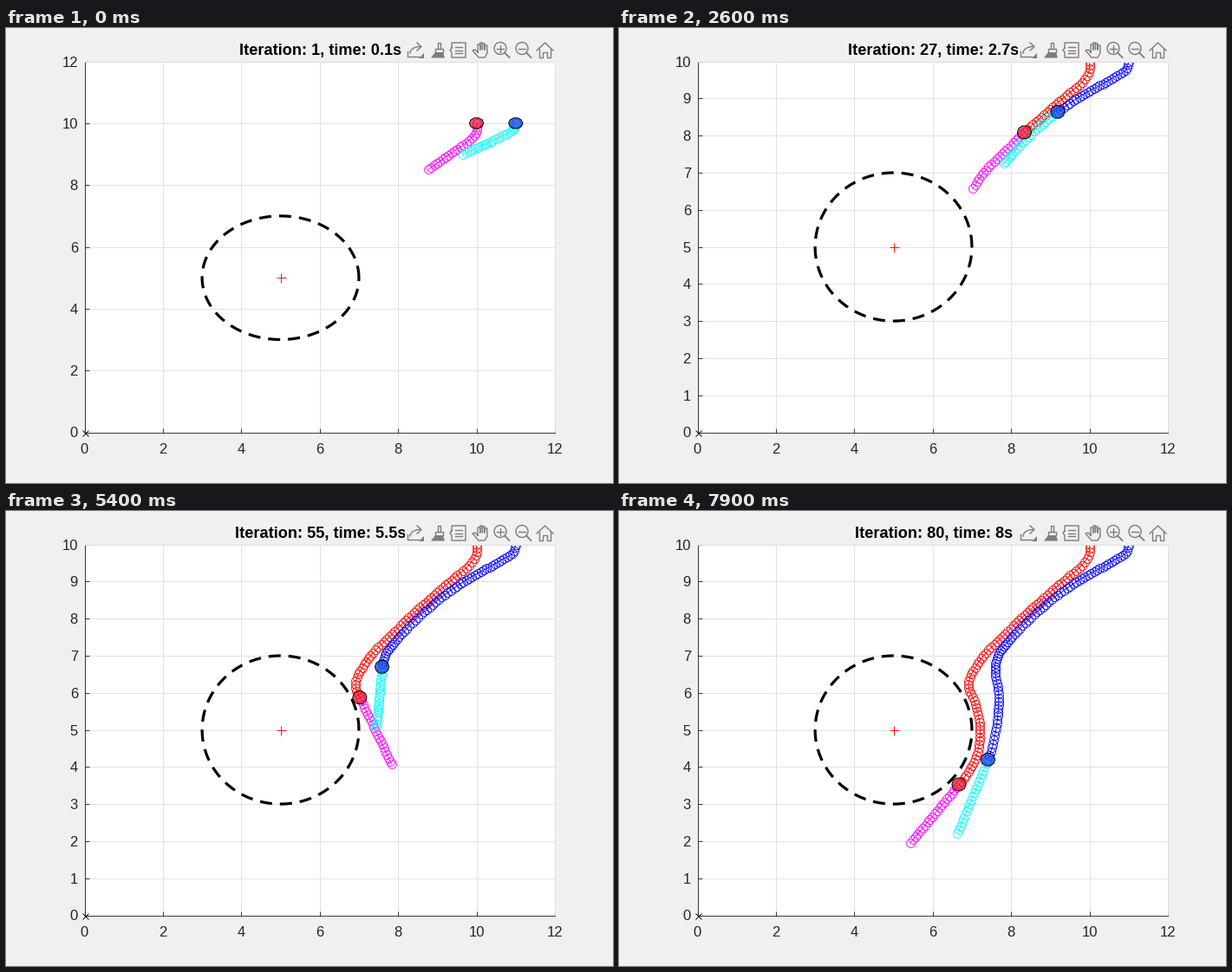
Recreate the animation shown at these times as a matplotlib script. Size 700 by 525 pixels, loop 8 s.

```python
import numpy as np
import matplotlib.pyplot as plt
from matplotlib.animation import FuncAnimation
from matplotlib.patches import Circle, Polygon, Rectangle

W, H, FRAMES, STEP_MS = 700, 525, 80, 100
PX = 0.72            # points per pixel at 100 dpi
BG, INK, GRID, ICON = "#f0f0f0", "#262626", "#dedede", "#7d7d7d"
RADIUS, HORIZON = 0.18, 20
BRAKE, SWERVE, CLEAR = 29, 45, 53    # steps at which the plans change

plt.rcParams["font.family"] = "Liberation Sans"


class Robot:
    """Moves on a smooth curve through a few (step, x, y) way points."""

    def __init__(self, *way):
        way = np.array(way, float)
        self.t, self.p = way[:, 0], way[:, 1:]
        self.v = np.gradient(self.p, self.t, axis=0)

    def at(self, t):
        t = np.atleast_1d(t).astype(float)
        i = np.clip(np.searchsorted(self.t, t, side="right") - 1, 0, len(self.t) - 2)
        h = (self.t[i + 1] - self.t[i])[:, None]
        u = (t - self.t[i])[:, None] / h
        return ((1 + 2 * u) * (1 - u) ** 2 * self.p[i]
                + u * (1 - u) ** 2 * h * self.v[i]
                + u * u * (3 - 2 * u) * self.p[i + 1]
                + u * u * (u - 1) * h * self.v[i + 1])

    def plan(self, k):
        """Follow the curve, braking near the obstacle; once clear, go straight."""
        s = np.linspace(0, 1, HORIZON + 1)
        slack = np.clip(0.7 * (k - BRAKE), 0, HORIZON / 2)
        follow = self.at(k + HORIZON * s - slack * s * s)
        velocity = (self.at(k + 0.5) - self.at(k - 0.5 if k else 0)) / (1 if k else 0.5)
        straight = self.at(k) + HORIZON * s[:, None] * velocity
        w = np.clip((k - SWERVE) / (CLEAR - SWERVE), 0, 1)
        return (1 - w) * follow + w * straight


red = Robot((0, 10, 10), (3, 9.98, 9.7), (6, 9.8, 9.44), (12, 9.36, 9.04),
            (18, 8.92, 8.64), (33, 7.85, 7.59), (44, 7.13, 6.76),
            (50, 6.91, 6.23), (56, 7.09, 5.69), (63, 7.21, 5.01),
            (70, 7.12, 4.32), (79, 6.67, 3.53), (84, 6.33, 3.16))
blue = Robot((0, 11, 10), (3, 10.92, 9.76), (6, 10.7, 9.62), (12, 10.26, 9.35),
             (18, 9.81, 9.09), (33, 8.66, 8.18), (44, 7.91, 7.37),
             (49, 7.69, 7.07), (54, 7.59, 6.7), (62, 7.68, 5.96),
             (68, 7.66, 5.38), (79, 7.41, 4.2), (84, 7.18, 3.72))

fig = plt.figure(figsize=(W / 100, H / 100), dpi=100, facecolor=BG)

# Plot area
ax = fig.add_axes([90.5 / W, 58.5 / H, 542.5 / W, 427.9 / H])
ax.set_xlim(0, 12)
ax.set_xticks(range(0, 13, 2))
ax.set_axisbelow(True)
ax.grid(color=GRID, lw=0.83 * PX)
ax.tick_params(direction="in", length=5.4 * PX, width=0.9 * PX, color=INK,
               labelcolor=INK, labelsize=16.67 * PX)
ax.tick_params(axis="x", pad=12.5 * PX)
ax.tick_params(axis="y", pad=7.5 * PX)
for side, spine in ax.spines.items():
    spine.set_color(GRID if side in ("top", "right") else INK)
    spine.set_linewidth(0.9 * PX)

ax.plot(0, 0, "kx", ms=7 * PX, mew=0.9 * PX, clip_on=False, zorder=5)
a = np.linspace(0, 2 * np.pi, 200)
ax.plot(5 + 2 * np.cos(a), 5 + 2 * np.sin(a), "k", lw=3.2 * PX,
        ls=(0, (14 / 3.2, 9 / 3.2)), dash_capstyle="butt")
ax.plot(5, 5, "r+", ms=11 * PX, mew=0.9 * PX)


def chain(color):
    return ax.plot([], [], "-o", color=color, lw=0.83 * PX, ms=10 * PX,
                   mfc="none", mew=0.83 * PX)[0]


def disc(rgb):
    return ax.add_patch(Polygon([(0, 0)], fc=(*rgb, 0.7), ec="k",
                                lw=PX, zorder=4))


parts = [(red, chain("#ff0000"), chain("#ff00ff"), disc((0.95, 0.1, 0.15))),
         (blue, chain("#0000ff"), chain("#00ffff"), disc((0.05, 0.2, 0.9)))]
corner = np.arange(10) * np.pi / 5
decagon = RADIUS * np.column_stack([np.cos(corner), np.sin(corner)])

# Title and toolbar, in pixel coordinates
top = fig.add_axes([0, 0, 1, 1], zorder=3)
top.set_xlim(0, W)
top.set_ylim(H, 0)
top.axis("off")
title = top.text(362.7, 31, "", ha="center", va="baseline", weight="bold",
                 size=18.1 * PX, color="k", zorder=1)
top.add_patch(Rectangle((459.5, 13), 175, 24, fc=BG, ec="none", zorder=2))


def stroke(*pts, lw=1.4):
    top.plot(*zip(*pts), color=ICON, lw=lw * PX, zorder=3, solid_joinstyle="round")


def fill(*pts):
    top.add_patch(Polygon(pts, fc=ICON, ec="none", zorder=3))


def export(x):
    stroke((x - 9, 27), (x - 9, 33), (x + 4, 33))
    u = np.linspace(0, np.pi / 2, 12)
    stroke(*zip(x + 5 - 11 * np.cos(u), 29 - 7.5 * np.sin(u)))
    stroke((x + 2, 17), (x + 7, 21.5), (x + 2, 26))
    fill((x + 4, 34.5), (x + 9.5, 34.5), (x + 9.5, 29))


def brush(x):
    stroke((x, 24), (x, 17), (x + 3, 17), (x + 3, 24))
    stroke((x - 3, 28), (x - 3, 24), (x + 6, 24), (x + 6, 28))
    fill((x - 3, 28), (x + 6, 28), (x + 8, 34.5), (x - 8, 34.5))


def data_tip(x):
    stroke((x - 8, 23), (x - 8, 17), (x + 8, 17), (x + 8, 34), (x - 8, 34),
           (x - 8, 28), (x - 10, 25.5), (x - 8, 23))
    for y in (22, 25.5, 29):
        stroke((x - 4, y), (x + 4, y))


def hand(x):
    fingers = []
    for i, tip in enumerate((19, 17, 18, 20)):
        left = x - 3 + 2.7 * i
        fingers += [(left, 25), (left, tip), (left + 2.7, tip), (left + 2.7, 25)]
    stroke((x - 3, 28), *fingers, (x + 8, 29), (x + 5, 34), (x - 2, 34),
           (x - 9, 26), (x - 6, 25), (x - 3, 28))


def lens(x, plus):
    top.add_patch(Circle((x - 1, 23.5), 7, fc="none", ec=ICON, lw=1.4 * PX, zorder=3))
    stroke((x - 5, 23.5), (x + 3, 23.5))
    if plus:
        stroke((x - 1, 19.5), (x - 1, 27.5))
    stroke((x + 4, 28.5), (x + 9.5, 34), lw=1.8)


def home(x):
    stroke((x - 9.5, 26), (x, 17), (x + 9.5, 26))
    stroke((x - 6.5, 24), (x - 6.5, 34), (x - 2.5, 34), (x - 2.5, 28),
           (x + 2.5, 28), (x + 2.5, 34), (x + 6.5, 34), (x + 6.5, 24))


export(472)
brush(498)
data_tip(522)
hand(547)
lens(571, True)
lens(596, False)
home(621.5)


def update(k):
    spots = [bot.at(k)[0] for bot, *_ in parts]
    tall = max(y for _, y in spots) + decagon[:, 1].max() > 10
    ax.set_ylim(0, 12 if tall else 10)
    ax.set_yticks(range(0, 13, 2) if tall else range(11))
    for spot, (bot, trail, ahead, body) in zip(spots, parts):
        trail.set_data(*bot.at(np.arange(k + 1)).T)
        ahead.set_data(*bot.plan(k).T)
        body.set_xy(spot + decagon)
    title.set_text(f"Iteration: {k + 1}, time: {(k + 1) / 10:g}s")
    return []


anim = FuncAnimation(fig, update, frames=FRAMES, interval=STEP_MS,
                     init_func=lambda: update(0), repeat=True, repeat_delay=0)
plt.show()
```
